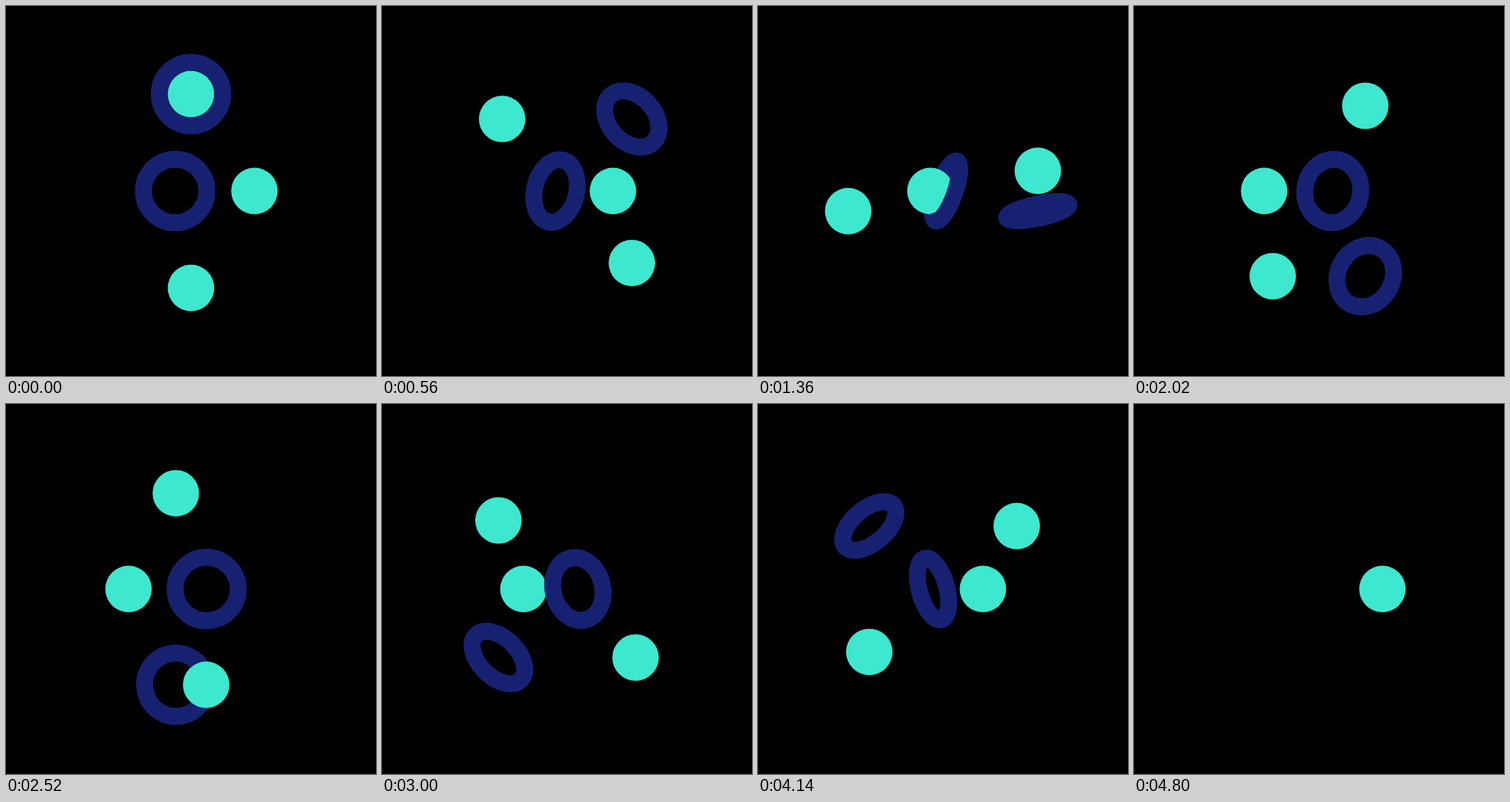
Animation of 500 by 500 pixels, one loop 4820 ms. Source, as an HTML page:

```html
<!DOCTYPE html>
<html lang="en">
<head>
<meta charset="utf-8">
<title>Rings and balls</title>
<style>
  html, body { margin: 0; width: 100%; height: 100%; overflow: hidden; background: #000; }
  svg { display: block; width: 100%; height: 100%; }
  path { fill: none; stroke: #162271; stroke-width: 22.86; stroke-linecap: round; }
  circle { fill: #3de8cf; }
</style>
</head>
<body>
<svg viewBox="0 0 500 500"></svg>
<script>
const LOOP = 4820, TURN = 4800, STEP = 20;
const C = 250, ORBIT = 131, RING = 42.86, BALL = 31.4;
const svg = document.querySelector('svg');

const add = (tag, attrs = {}) => {
  const el = document.createElementNS('http://www.w3.org/2000/svg', tag);
  for (const k in attrs) el.setAttribute(k, attrs[k]);
  return svg.appendChild(el);
};

// Back halves, balls, front halves: the balls pass through the rings.
const backs = [add('path'), add('path')];
const balls = [0, 1, 2].map(() => add('circle', { r: BALL }));
const fronts = [add('path'), add('path')];

// Spin angle of each ring: [ms, degrees], periodic over one turn.
const outerSpin = spline([[0, 0], [560, 44], [1360, 103], [2020, 149.2],
  [2400, 180], [3000, 232.3], [4140, 302.4]]);
const innerSpin = spline([[0, 0], [560, 48.4], [1360, 106.3], [2020, 151.6],
  [3000, 218.6], [4140, 295.7]]);

function spline(keys) {
  const n = keys.length;
  const at = i => {
    const lap = Math.floor(i / n), [t, v] = keys[i - lap * n];
    return [t + lap * TURN, v + lap * 360];
  };
  const slope = i => {
    const [t0, v0] = at(i - 1), [t1, v1] = at(i), [t2, v2] = at(i + 1);
    const a = t1 - t0, b = t2 - t1;
    return ((v1 - v0) / a * b + (v2 - v1) / b * a) / (a + b);
  };
  return t => {
    let i = 0;
    while (i < n - 1 && at(i + 1)[0] <= t) i++;
    const [t0, v0] = at(i), [t1, v1] = at(i + 1);
    const d = t1 - t0, u = (t - t0) / d, w = 1 - u;
    return v0 * w * w * (1 + 2 * u) + v1 * u * u * (3 - 2 * u)
      + d * u * w * (slope(i) * w - slope(i + 1) * u);
  };
}

const rad = deg => deg * Math.PI / 180;
const smooth = u => u * u * (3 - 2 * u);

function placeBall(el, x, y) {
  el.setAttribute('cx', x);
  el.setAttribute('cy', y);
}

function placeRing(i, x, y, tilt, spin, dir) {
  const c = Math.cos(rad(spin));
  const right = dir * c * (spin < 180 ? -1 : 1) > 0;
  const half = (el, sweep) => {
    el.setAttribute('d', `M0 ${-RING}A${Math.abs(c) * RING} ${RING} 0 0 ${sweep} 0 ${RING}`);
    el.setAttribute('transform', `translate(${x} ${y}) rotate(${tilt})`);
  };
  half(fronts[i], right ? 1 : 0);
  half(backs[i], right ? 0 : 1);
}

function draw(ms) {
  const t = Math.floor((ms % LOOP) / STEP) * STEP;
  const on = t < TURN;
  for (const el of [...backs, ...fronts, balls[0], balls[1]])
    el.style.display = on ? '' : 'none';

  const deg = t / TURN * 360;
  const sx = Math.sin(rad(deg)), cx = Math.cos(rad(deg));
  const half = t / (TURN / 2);
  const swing = half < 1 ? 1 - 2 * smooth(half) : 2 * smooth(Math.min(half - 1, 1)) - 1;

  placeBall(balls[2], C + 85.7 * swing, C);
  if (!on) return;
  placeBall(balls[0], C - ORBIT * sx, C - ORBIT * cx);
  placeBall(balls[1], C + ORBIT * sx, C + ORBIT * cx);
  placeRing(0, C + ORBIT * sx, C - ORBIT * cx, -deg, outerSpin(t), -1);
  placeRing(1, C - 21.43 * swing, C, 20 * sx, innerSpin(t), 1);
}

const start = performance.now();
function tick() {
  draw(performance.now() - start);
  requestAnimationFrame(tick);
}
draw(0);
requestAnimationFrame(tick);
</script>
</body>
</html>
```
